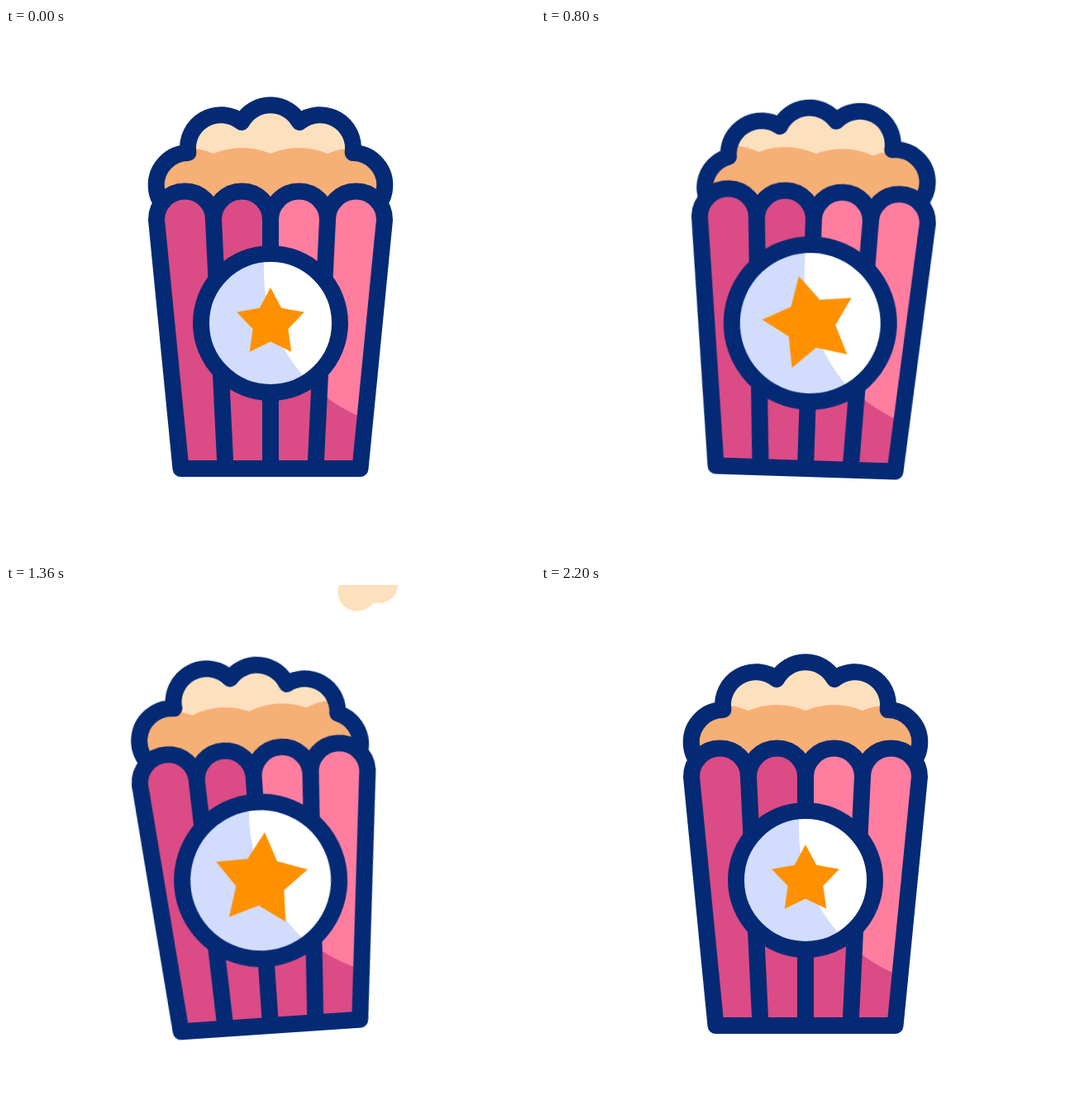
These frames come from a looping animation (640 by 640 pixels, 2.4 s). An HTML page:

```html
<!DOCTYPE html>
<html lang="en">
<head>
<meta charset="utf-8">
<title>Popcorn</title>
<style>
  html, body { margin: 0; width: 100%; height: 100%; overflow: hidden; background: #fff; }
  svg { display: block; width: 100%; height: 100%; }

  .line { fill: none; stroke: #042a75; stroke-width: 20; stroke-linejoin: round; stroke-linecap: round; }
  .cream { fill: #fde0be; }
  .orange { fill: #f6af75; }
  .pink { fill: #db4b85; }
  .rose { fill: #ff7d9f; }
  .blue { fill: #d2dcfd; }
  .white { fill: #fff; }
  .star { fill: #ff9100; }

  .bucket, .heap, .badge, .spin, .zoom {
    animation: 2.4s cubic-bezier(.37, 0, .63, 1) infinite;
  }
  .bucket { transform-origin: 320px 533px; animation-name: sway; }
  .heap { animation-name: lean; }
  .badge, .spin, .zoom { transform-origin: 320px 357px; }
  .badge, .zoom { animation-name: grow; }
  .badge { --size: 1.131; }
  .zoom { --size: 1.36; }
  .spin { animation-name: tilt; }
  .badge .line { vector-effect: non-scaling-stroke; }

  @keyframes sway {
    0%, 8.33% { transform: rotate(0deg); }
    22.08% { transform: rotate(-6.8deg); }
    43.13% { transform: rotate(8.75deg); }
    64.25% { transform: rotate(-8.8deg); animation-timing-function: cubic-bezier(.5, 1, .89, 1); }
    91.67%, 100% { transform: rotate(0deg); }
  }
  /* The heap trails the bucket, its top bumps leaning further than its sides. */
  @keyframes lean {
    0%, 8.33%, 91.67%, 100% {
      d: path("M221 229A39 39 0 0 1 220.4 151A40 40 0 0 1 285 114A40 40 0 0 1 355 114A40 40 0 0 1 419.6 151A39 39 0 0 1 419 229L400 258L240 258Z");
    }
    28.33% {
      d: path("M226 238A39 39 0 0 1 212 162A40 40 0 0 1 271 122A40 40 0 0 1 339 110A40 40 0 0 1 410 141A39 39 0 0 1 423 219L400 258L240 258Z");
    }
    50.42% {
      d: path("M216 215A39 39 0 0 1 234 137A40 40 0 0 1 307 108A40 40 0 0 1 375 125A40 40 0 0 1 431 167A39 39 0 0 1 412 242L400 258L240 258Z");
    }
    72.92% {
      d: path("M228 242A39 39 0 0 1 209 167A40 40 0 0 1 265 125A40 40 0 0 1 333 108A40 40 0 0 1 406 137A39 39 0 0 1 424 215L400 258L240 258Z");
    }
  }
  @keyframes tilt {
    0%, 8.33% { transform: rotate(0deg); }
    29.6% { transform: rotate(-18deg); }
    50.42% { transform: rotate(13.5deg); }
    73.5% { transform: rotate(-15deg); }
    91.67%, 100% { transform: rotate(0deg); }
  }
  @keyframes grow {
    0%, 8.33% { transform: scale(1); }
    32%, 68% { transform: scale(var(--size)); }
    91.67%, 100% { transform: scale(1); }
  }

  /* Each kernel flies for 16% of the loop, then waits off stage. */
  .kernel {
    offset-rotate: 0deg;
    animation: fly 2.4s linear var(--start) infinite backwards, pop 2.4s linear var(--start) infinite backwards;
  }
  .right { --start: .92s; --turn: 60deg; offset-path: path("M395 140 Q495 25 700 40"); }
  .up { --start: 1.13s; --turn: 10deg; offset-path: path("M360 145 L485 -103"); }
  .left { --start: 1.48s; --turn: -9deg; offset-path: path("M270 150 Q170 78 -70 105"); }
  @keyframes fly {
    0% { offset-distance: 0%; visibility: visible; }
    16% { offset-distance: 100%; visibility: visible; }
    16.01%, 100% { offset-distance: 100%; visibility: hidden; }
  }
  @keyframes pop {
    0% { transform: rotate(var(--turn)) scale(.2); }
    6.5%, 100% { transform: rotate(var(--turn)) scale(1); }
  }
</style>
</head>
<body>
<svg viewBox="0 0 640 640">
  <defs>
    <path id="tub" d="M182 232a34.5 34.5 0 0 1 69 0a34.5 34.5 0 0 1 69 0a34.5 34.5 0 0 1 69 0a34.5 34.5 0 0 1 69 0L428.5 533H211.5Z"/>
    <circle id="disc" cx="320" cy="357" r="84"/>
    <circle id="light" cx="502" cy="295" r="190"/>
    <g id="kernel">
      <circle cx="16" r="23.5"/>
      <circle cx="-8" cy="14" r="23.5"/>
      <circle cx="-8" cy="-14" r="23.5"/>
    </g>
    <clipPath id="inTub"><use href="#tub"/></clipPath>
    <clipPath id="inHeap"><path class="heap"/></clipPath>
    <clipPath id="inDisc"><use href="#disc"/></clipPath>
  </defs>

  <g class="cream">
    <g class="kernel right"><use href="#kernel"/></g>
    <g class="kernel up"><use href="#kernel"/></g>
    <g class="kernel left"><use href="#kernel"/></g>
  </g>

  <g class="bucket">
    <path class="heap cream"/>
    <g clip-path="url(#inHeap)">
      <path class="orange" d="M113 152a88 88 0 0 1 69 0a88 88 0 0 1 69 0a88 88 0 0 1 69 0a88 88 0 0 1 69 0a88 88 0 0 1 69 0a88 88 0 0 1 69 0V320H113Z"/>
    </g>
    <path class="heap line"/>

    <use href="#tub" class="pink"/>
    <g clip-path="url(#inTub)"><use href="#light" class="rose"/></g>
    <path class="line" d="M251 232L265.5 533M320 232V533M389 232L374.5 533"/>
    <use href="#tub" class="line"/>

    <g class="badge">
      <use href="#disc" class="blue"/>
      <g clip-path="url(#inDisc)"><use href="#light" class="white"/></g>
      <circle class="line" cx="320" cy="357" r="84"/>
    </g>
    <g class="spin"><g class="zoom"><polygon class="star" id="star"/></g></g>
  </g>
</svg>
<script>
  const corners = Array.from({ length: 10 }, (_, i) => {
    const r = i % 2 ? 22.5 : 43;
    const a = i * Math.PI / 5;
    return [320 + r * Math.sin(a), 357 - r * Math.cos(a)].map(v => v.toFixed(2)).join();
  });
  document.getElementById("star").setAttribute("points", corners.join(" "));
</script>
</body>
</html>
```
